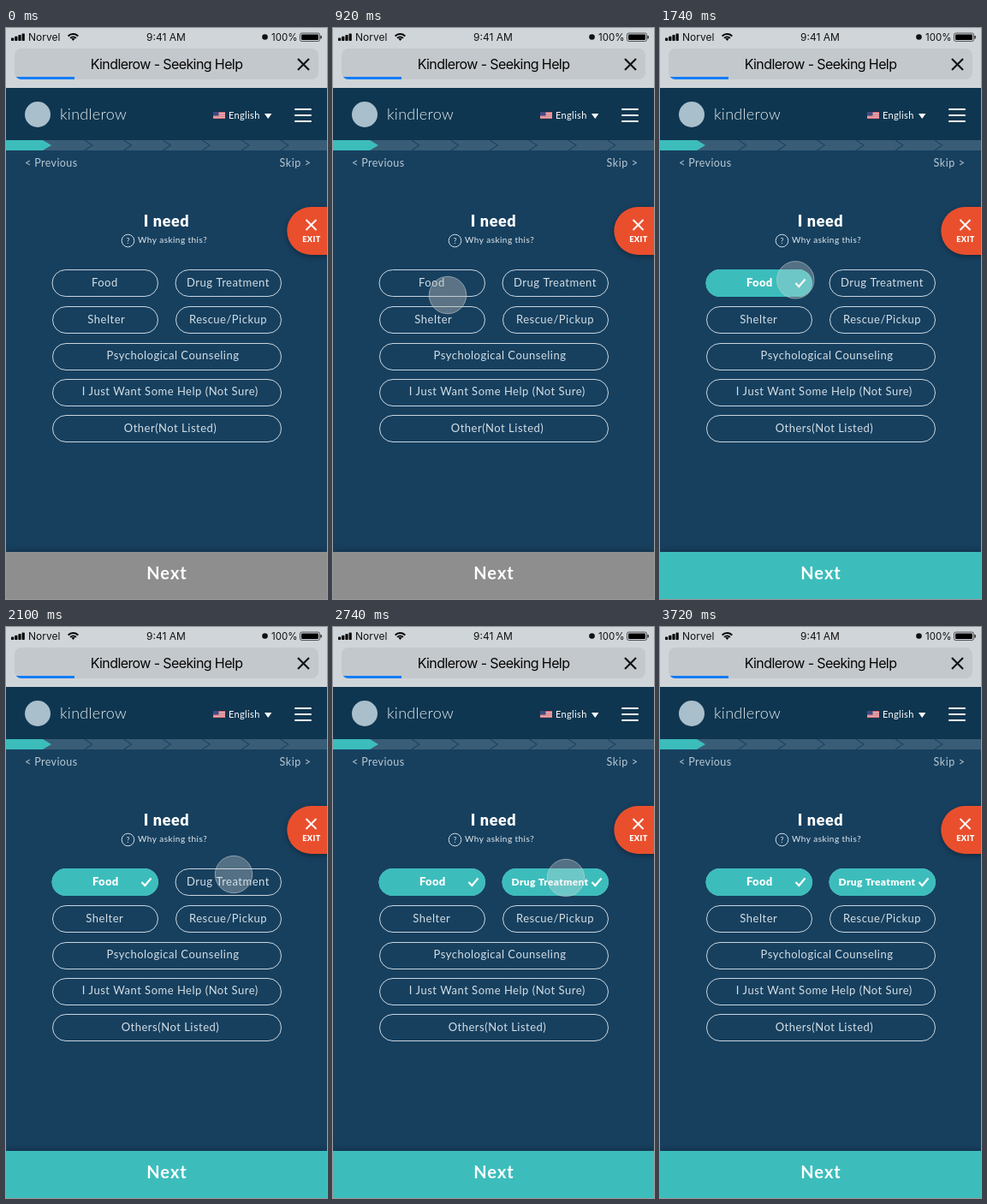
An HTML page with a canvas that plays this animation: 375x667 px, repeating every 4340 ms.

```html
<!DOCTYPE html>
<html lang="en">
<head>
<meta charset="utf-8">
<title>Seeking Help</title>
<style>
  html, body { margin: 0; width: 100%; height: 100%; overflow: hidden; background: #17405f; }
  canvas { display: block; width: 375px; height: 667px; }
</style>
</head>
<body>
<canvas id="stage"></canvas>
<script>
const W = 375, H = 667, LOOP = 4340, STEP = 20;
const canvas = document.getElementById('stage');
const ratio = window.devicePixelRatio || 1;
canvas.width = W * ratio;
canvas.height = H * ratio;
const ctx = canvas.getContext('2d');
ctx.scale(ratio, ratio);

const UI = 'Lato, sans-serif', SYSTEM = 'Inter, sans-serif';
const BG = '#17405f', TEAL = '#3cbdbc', SOFT = '#d3dee5', DIM = '#b9c8d2';
const TEAL_RGB = [60, 189, 188], GRAY_RGB = [142, 142, 142], CLEAR_RGB = [0, 0, 0];
const FOOD_AT = 1340, DRUG_AT = 2400, FADE = 300;

// Pointer keys: time, x, y
const POINTER = [
  [360, 349, 6], [400, 309, 98], [440, 245, 204], [500, 156, 299], [540, 130, 325], [580, 119, 332],
  [820, 119, 332], [920, 134, 312], [1040, 146, 299], [1140, 143, 298], [1220, 141, 298],
  [1700, 141, 298], [1780, 188, 289], [1880, 254, 283], [2100, 266, 289], [2240, 272, 293],
  [3300, 272, 293], [3320, 268, 291], [3350, 266, 283], [3480, 282, 210], [3600, 321, 95], [3720, 350, -25]
];

const lerp = (a, b, p) => a + (b - a) * p;
const mix = (from, to, p, alpha = 1) =>
  `rgba(${from.map((c, i) => Math.round(lerp(c, to[i], p)))},${alpha})`;

// The curve of cubic-bezier(.25, .1, .25, 1)
function ease(x) {
  if (x <= 0) return 0;
  if (x >= 1) return 1;
  let lo = 0, hi = 1;
  for (let i = 0; i < 24; i++) {
    const s = (lo + hi) / 2;
    if (0.75 * s * (1 - s) + s ** 3 < x) lo = s; else hi = s;
  }
  return 0.3 * lo * (1 - lo) ** 2 + 3 * lo * lo * (1 - lo) + lo ** 3;
}

// Smooth interpolation that never overshoots its keys
function track(keys, axis, t) {
  const last = keys.length - 2;
  const slope = i => (keys[i + 1][axis] - keys[i][axis]) / (keys[i + 1][0] - keys[i][0]);
  const tangent = i => {
    if (i === 0) return slope(0);
    if (i > last) return slope(last);
    const a = slope(i - 1), b = slope(i);
    return a * b > 0 ? 2 * a * b / (a + b) : 0;
  };
  let i = 0;
  while (i < last && t >= keys[i + 1][0]) i++;
  const d = keys[i + 1][0] - keys[i][0], p = (t - keys[i][0]) / d;
  const q = p * p * (3 - 2 * p);
  return lerp(keys[i][axis], keys[i + 1][axis], q)
    + d * p * (1 - p) * (tangent(i) * (1 - p) - tangent(i + 1) * p);
}

function rect(x, y, w, h, color) {
  ctx.fillStyle = color;
  ctx.fillRect(x, y, w, h);
}

function pill(x, y, w, h, r, color) {
  ctx.beginPath();
  ctx.roundRect(x, y, w, h, r);
  ctx.fillStyle = color;
  ctx.fill();
}

function disc(x, y, r, color) {
  ctx.beginPath();
  ctx.arc(x, y, r, 0, 7);
  ctx.fillStyle = color;
  ctx.fill();
}

function ring(x, y, r, color) {
  ctx.beginPath();
  ctx.arc(x, y, r, 0, 7);
  ctx.strokeStyle = color;
  ctx.lineWidth = 1;
  ctx.stroke();
}

function line(points, color, width) {
  ctx.beginPath();
  points.forEach(([x, y]) => ctx.lineTo(x, y));
  ctx.strokeStyle = color;
  ctx.lineWidth = width;
  ctx.stroke();
}

function polygon(points, color) {
  ctx.beginPath();
  points.forEach(([x, y]) => ctx.lineTo(x, y));
  ctx.fillStyle = color;
  ctx.fill();
}

function cross(x, y, r, color, width) {
  line([[x - r, y - r], [x + r, y + r]], color, width);
  line([[x + r, y - r], [x - r, y + r]], color, width);
}

function text(str, x, y, size, { weight = 400, color = '#fff', align = 'left', gap = 0, family = UI } = {}) {
  ctx.font = `${weight} ${size}px ${family}`;
  ctx.letterSpacing = gap + 'px';
  ctx.textAlign = align;
  ctx.fillStyle = color;
  ctx.fillText(str, x, y);
}

function shadow(color, blur, y) {
  ctx.shadowColor = color;
  ctx.shadowBlur = blur * ratio;
  ctx.shadowOffsetY = y * ratio;
}

function browserBar() {
  rect(0, 0, W, 70, '#d0d5d9');
  for (let i = 0; i < 4; i++) pill(6 + i * 4.2, 11.5 - i * 1.7, 3.2, 3.5 + i * 1.7, 0.7, '#050505');
  text('Norvel', 26, 15, 12, { color: '#111', family: SYSTEM });

  ctx.strokeStyle = '#080808';
  ctx.lineWidth = 2;
  for (const r of [4.6, 8]) {
    ctx.beginPath();
    ctx.arc(78.5, 15, r, -Math.PI * 0.76, -Math.PI * 0.24);
    ctx.stroke();
  }
  polygon([[78.5, 15], [76.4, 12.6], [78.5, 11.8], [80.6, 12.6]], '#080808');

  text('9:41 AM', 187, 15, 12, { color: '#111', align: 'center', family: SYSTEM });
  disc(302.5, 10.5, 3.3, '#111');
  text('100%', 310, 15, 11.5, { color: '#111', family: SYSTEM });
  ctx.beginPath();
  ctx.roundRect(343.5, 6, 23, 9.5, 2);
  ctx.strokeStyle = '#333';
  ctx.lineWidth = 0.8;
  ctx.stroke();
  pill(345, 7.5, 20, 6.5, 1, '#000');
  rect(367.4, 9, 1.4, 3.5, '#222');

  ctx.save();
  pill(10, 24, 355, 36, 8, '#c3c8cc');
  ctx.clip();
  rect(10, 57, 70, 3, '#147cf6');
  ctx.restore();
  text('Kindlerow - Seeking Help', 187.5, 48, 16, { color: '#050505', align: 'center', gap: -0.6, family: SYSTEM });
  cross(347.5, 42.5, 6.5, '#111', 2.2);
}

function header() {
  rect(0, 70, W, 61, '#0f3650');
  disc(37, 101, 15, '#a9bfcc');
  text('kindlerow', 63, 107, 18, { weight: 300, color: '#e5edf1', gap: 0.3 });

  rect(242, 98, 14, 8, '#f2e9ea');
  for (let i = 0; i < 4; i++) rect(242, 98 + i * 2.2, 14, 1.2, '#d2505c');
  rect(242, 98, 6.5, 4.5, '#3e4b80');
  text('English', 260, 106, 11, { gap: 0.35 });
  polygon([[302, 100], [310.4, 100], [306.2, 106]], '#fff');
  for (const y of [94, 101, 108]) pill(337, y, 20, 2, 1, '#fff');

  rect(0, 131, W, 12, '#3a5d77');
  polygon([[0, 131], [43, 131], [53, 137], [43, 143], [0, 143]], TEAL);
  for (let i = 1; i < 7; i++) {
    const tip = 55 + i * 45.8;
    line([[tip - 9, 131], [tip, 137], [tip - 9, 143]], '#1b4462', 1.1);
  }

  text('< Previous', 22, 162, 12.5, { color: DIM, gap: 0.4 });
  text('Skip >', 356.5, 162, 12.5, { color: DIM, gap: 0.6, align: 'right' });
}

function heading() {
  text('I need', 187.5, 232, 18, { weight: 900, align: 'center', gap: 0.6 });
  ring(142.5, 248.5, 7.3, SOFT);
  text('?', 142.5, 252, 9, { color: SOFT, align: 'center' });
  text('Why asking this?', 154, 251, 10, { color: '#e2e9ee', gap: 0.45 });
}

function exitButton() {
  ctx.save();
  shadow('rgba(0,0,0,.35)', 6, 2);
  pill(328.3, 209, 75, 56, 28, '#e94f2d');
  ctx.restore();
  cross(356.5, 230, 6, '#fff', 2);
  text('EXIT', 357, 250, 9.2, { weight: 900, align: 'center', gap: 0.4 });
}

function option(label, x, y, w, { fill = 0, on = false, cx, base = 19.5, size = 13, gap = 0.5 }) {
  ctx.beginPath();
  ctx.roundRect(x, y, w, 31, 15.5);
  ctx.strokeStyle = '#c9d6de';
  ctx.lineWidth = 1;
  ctx.stroke();
  if (fill) pill(x - 0.5, y - 0.5, w + 1, 32, 16, mix(CLEAR_RGB, TEAL_RGB, fill, fill));
  text(label, cx, y + base, size, { weight: on ? 900 : 400, color: on ? '#fff' : SOFT, align: 'center', gap });
  if (on) {
    const tx = x + w - 13.5;
    line([[tx - 5.5, y + 15.5], [tx - 1.7, y + 19.5], [tx + 5.5, y + 11]], '#fff', 2.2);
  }
}

function options(t, food, drug) {
  const foodOn = t > FOOD_AT, drugOn = t > DRUG_AT;
  option('Food', 54, 282.5, 123.5, { fill: food, on: foodOn, cx: lerp(115.3, 116.3, food), gap: foodOn ? 0.3 : 0.5 });
  option('Drug Treatment', 198, 282.5, 123.5, {
    fill: drug, on: drugOn, cx: lerp(259.5, 253.5, drug), size: drugOn ? 12 : 13, gap: drugOn ? 0.3 : 0.5
  });
  option('Shelter', 54.5, 325.5, 123, { cx: lerp(117.3, 115.3, food) });
  option('Rescue/Pickup', 198.5, 325.5, 123, { cx: 259.5 });
  option('Psychological Counseling', 54.5, 368.5, 267, { cx: 195, base: 18.5 });
  option('I Just Want Some Help (Not Sure)', 54.5, 410.5, 267, { cx: 191.7, base: 18.5 });
  option(foodOn ? 'Others(Not Listed)' : 'Other(Not Listed)', 54.5, 452.5, 267, { cx: 192 });
}

function nextBar(active) {
  ctx.save();
  shadow('rgba(0,0,0,.3)', 8, -1);
  rect(0, 612, W, 60, mix(GRAY_RGB, TEAL_RGB, active));
  ctx.restore();
  text('Next', 188, 644, 20, { weight: 700, align: 'center', gap: 1 });
}

function pointer(t, released) {
  if (t < 360 || t >= 3720) return;
  const x = track(POINTER, 1, t), y = track(POINTER, 2, t);
  const shade = lerp(185, 220, released);
  disc(x, y, 21.5, `rgba(${shade},${shade},${shade},${lerp(0.42, 0.3, released)})`);
  ring(x, y, 21.7, 'rgba(215,215,210,.6)');
}

function draw(t) {
  const food = ease((t - FOOD_AT) / FADE), drug = ease((t - DRUG_AT) / FADE);
  rect(0, 0, W, H, BG);
  browserBar();
  header();
  heading();
  options(t, food, drug);
  exitButton();
  nextBar(food);
  pointer(t, food);
}

function tick() {
  const t = performance.now() % LOOP;
  draw(Math.floor(t / STEP) * STEP);
  requestAnimationFrame(tick);
}
tick();
</script>
</body>
</html>
```
